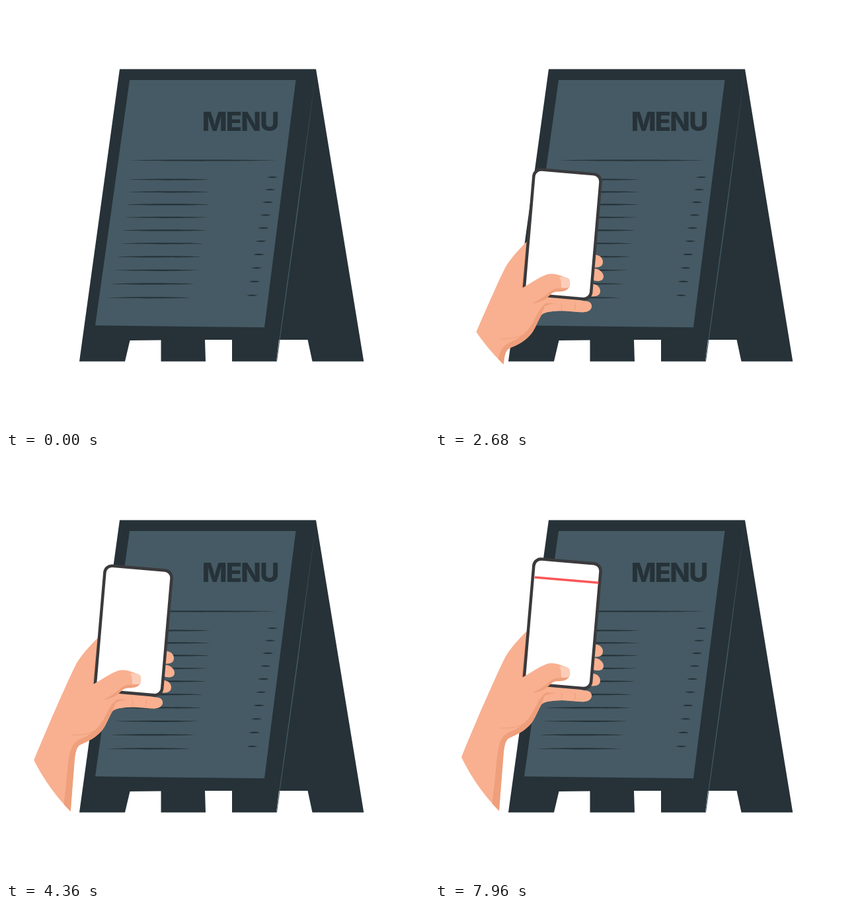
Recreate the animation shown at these times as an HTML page. Size 640 by 640 pixels, loop 8000 ms.

```html
<!DOCTYPE html>
<html lang="en">
<head>
<meta charset="utf-8">
<title>Menu board</title>
<style>
  html, body { margin: 0; width: 100%; height: 100%; overflow: hidden; background: #fff; }
  svg { display: block; width: 100vw; height: 100vh; }
  .dark { fill: #263238; }
  .slate { fill: #455a64; }
  .skin { fill: #f8b090; }
  .shade { fill: #ef9f7b; }
  .crease { fill: none; stroke: #ef9f7b; stroke-linecap: round; }
  text { font: 800 40px Inter, "Open Sans", sans-serif; letter-spacing: -1.8px; }
</style>
</head>
<body>
<svg viewBox="0 0 640 640">
  <clipPath id="stage"><circle cx="320" cy="318.5" r="311.2"/></clipPath>

  <path class="dark" d="M172 95.6H469L541.3 537.7H463.5L456.5 505H413L409 537.7H342V505H301L302 537.7H234.5V505.5L187.5 506L180 537.7H111Z"/>
  <path class="slate" d="M187 112H438.5L391 486.3L135 483.3Z"/>
  <path class="slate" d="M469 98L441 315L410 537.7H409L439.5 315Z"/>
  <text class="dark" x="296.8" y="188.7">MENU</text>
  <path id="rules" class="dark"/>

  <g clip-path="url(#stage)">
    <g id="hand">
      <!-- fingertips behind the phone -->
      <path class="skin" d="M241 284C249 284 254 289 254 295C254 301 249 304 240 303Z"/>
      <path class="skin" d="M238 305C248 304 255 311 255 317C255 323 249 326 237 322Z"/>
      <path class="skin" d="M236 328C245 328 250 333 250 339C250 345 245 348 235 347Z"/>

      <!-- arm, palm and little finger -->
      <path class="skin" d="M138 265C126 277 114 290 106 304C95 326 83 354 70 383C59 409 48 434 36 465L60 560H95C98 530 100 490 103 458C104 443 105 433 109 428C114 424 128 420 136 413C150 401 152 386 159 377C165 370 175 370 188 369C202 369 213 371 224 371C232 371 237 367 237 362C237 356 232 354 226 354L165 340L150 265Z"/>
      <path class="shade" d="M86 526C91 494 92 466 95 447C98 428 103 421 115 416C132 409 143 397 150 383C156 371 160 362 169 357C177 357 186 359 193 359C181 362 172 363 166 369C158 378 155 389 149 399C141 413 125 420 112 426C104 431 104 450 103 460C100 496 98 525 96 545Z"/>
      <path class="skin" d="M166 362C176 357 187 358 197 359L237 360C238 367 231 371 224 371C212 371 201 368 188 369C178 370 168 369 161 375Z"/>
      <path class="shade" d="M138 266L131 334H135L140 272Z"/>
      <path class="crease" d="M191 358Q193 363 191 367M212 358Q214 363 211 368"/>

      <g transform="translate(192.8 253) rotate(4.9)">
        <rect x="-53" y="-97" width="106" height="194" rx="13" fill="#3a3a3c"/>
        <rect x="-48.5" y="-92.5" width="97" height="185" rx="9" fill="#fff"/>
      </g>
      <path id="scan" d="M150.7 182.8L247.5 191" stroke="#fb5656" stroke-width="3.5"/>

      <!-- thumb over the phone -->
      <path class="skin" d="M131 335C145 327 158 318 169 314C181 310 192 317 200 319C205 321 205 328 203 333C200 338 191 340 184 339C177 340 174 345 168 350C160 357 158 368 152 379L110 375L118 335Z"/>
      <path class="shade" d="M204 329C202 335 193 336 187 335C177 335 172 343 164 348C157 353 150 356 147 358C157 356 163 354 169 350C175 344 178 340 185 340C195 340 203 338 204 329Z"/>
      <path fill="#fbcdb8" d="M188 318C193 317 198 318 202 320C205 323 204 329 203 333C199 335 194 335 191 333C191 327 191 322 188 318Z"/>
      <path class="crease" d="M167 358C158 367 157 383 146 396C137 406 121 412 100 411"/>
    </g>
  </g>
</svg>
<script>
const LOOP = 8000;
const REST_Y = -0.8;
const $ = id => document.getElementById(id);

// A thin stroke that narrows to a point at both ends.
const taper = (x, y, w) =>
  `M${x} ${y}c${w / 4} -1.5 ${w * 3 / 4} -1.5 ${w} 0c${-w / 4} 1.5 ${-w * 3 / 4} 1.5 ${-w} 0Z`;

// Each menu row has an item line and a price dash, slanting with the board.
let rules = taper(184, 233.5, 225);
for (let i = 0; i < 10; i++) {
  const y = 18.7 * i + 0.13 * i * i;
  rules += taper(185.3 - 1.2 * i - 0.26 * i * i, 262.5 + y, 126);
  rules += taper(395 - 3.4 * i, 259 + y, 16);
}
$('rules').setAttribute('d', rules);

// Time advances in uneven beats: five steps in every 560 ms.
function stepAt(ms) {
  const cycle = Math.floor((ms - 260) / 560);
  const rest = ms - 260 - cycle * 560;
  const beat = Math.min(4, Math.max(rest >= 40, Math.round(rest / 120)));
  return Math.max(0, cycle * 5 + 1 + beat);
}

// Distance of the hand below its resting place: an ease-out over 50 steps.
function dropAt(step) {
  const r = Math.max(0, 1 - step / 50);
  return 465 * r * r * (0.19 + r * (0.645 + r * (0.915 - 0.75 * r)));
}

function draw(now) {
  const step = stepAt(now % LOOP);
  $('hand').setAttribute('transform', `translate(0 ${REST_Y + dropAt(step)})`);
  $('scan').setAttribute('opacity', Math.min(1, Math.max(0, (step - 68) / 2)));
}

const start = performance.now();
function tick() {
  draw(performance.now() - start);
  requestAnimationFrame(tick);
}
tick();
</script>
</body>
</html>
```
